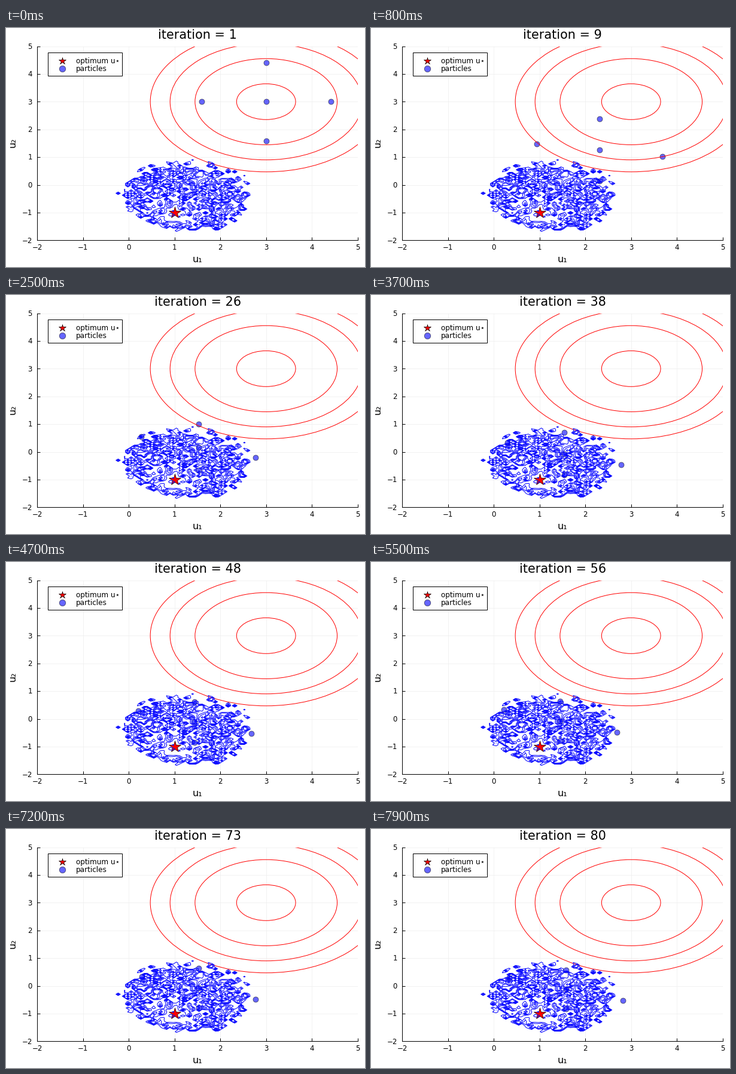
Animation of 600 by 400 pixels, one loop 8000 ms. Source, as a matplotlib script:

```python
import numpy as np
import matplotlib.pyplot as plt
from matplotlib.animation import FuncAnimation
from matplotlib.patches import Circle, Rectangle

W, H, DPI = 600, 400, 100
PT = 72 / DPI  # points per pixel
LEFT, TOP, RIGHT, BOTTOM = 52.2, 30.5, 587.7, 355.4

plt.rcParams["font.family"] = "DejaVu Sans"
fig = plt.figure(figsize=(W / DPI, H / DPI), dpi=DPI, facecolor="white")
ax = fig.add_axes([LEFT / W, 1 - BOTTOM / H, (RIGHT - LEFT) / W, (BOTTOM - TOP) / H])
ax.set(xlim=(-2, 5), ylim=(-2, 5), xticks=range(-2, 6), yticks=range(-2, 6))
ax.set_axisbelow(True)
ax.grid(color="#efefef", lw=0.8 * PT)
ax.spines[["top", "right"]].set_visible(False)
ax.spines[["left", "bottom"]].set_linewidth(PT)
ax.tick_params(direction="in", length=5 * PT, width=PT,
               labelbottom=False, labelleft=False)

# Overlay in pixel coordinates, origin at the top left
top = fig.add_axes([0, 0, 1, 1], zorder=5)
top.set(xlim=(0, W), ylim=(H, 0))
top.axis("off")


def label(x, y, s, px, ha="center", **kw):
    return top.text(x, y, s, fontsize=px * PT, ha=ha, va="baseline", **kw)


def marker(axes, x, y, shape, px, color, **kw):
    return axes.plot(x, y, shape, ms=px * PT, mfc=color, mec="black", **kw)[0]


def star(axes, x, y, px, **kw):
    return marker(axes, x, y, "*", px, "red", mew=0.7 * PT, **kw)


def dots(axes, x, y, px, **kw):
    return marker(axes, x, y, "o", px, "blue", mew=0.8 * PT, alpha=0.6, **kw)


for v in range(-2, 6):
    s = str(v).replace("-", "\u2212")
    label(LEFT + (v + 2) * (RIGHT - LEFT) / 7, 371, s, 11.8)
    label(43.7, BOTTOM - (v + 2) * (BOTTOM - TOP) / 7 + 4.3, s, 11.8, ha="right")
label(319.8, 392, "u₁", 16)
label(18.7, 191.5, "u₂", 16, rotation=90).set(va="center", ha="right")
title = label(320, 18, "", 20.8)

# Legend
top.add_patch(Rectangle((70, 41), 123.5, 39, fc="white", ec="black", lw=PT))
star(top, [94], [54.5], 12.5)
dots(top, [94], [67.5], 10.5)
label(116.7, 58.7, "optimum u⋆", 12, ha="left")
label(116.7, 72, "particles", 12, ha="left")

# Prior contours
for r in (0.645, 1.553, 2.098, 2.53):
    ax.add_patch(Circle((3, 3), r, fill=False, ec="red", lw=PT, zorder=4))

# Posterior of a noisy misfit; the noise grows away from the lower left
rng = np.random.default_rng(11)
g = np.linspace(-2, 5, 100)
X, Y = np.meshgrid(g, g)
r2 = ((X - 1.25) / 1.2) ** 2 + ((Y + 0.45) / 1.1) ** 2
noise = 0.3 + 0.6 * np.hypot(X - 0.9, Y + 1.3)
misfit = r2 ** 3 + noise * rng.standard_normal(X.shape)
ax.contour(X, Y, np.exp(-misfit ** 2), levels=(0.2, 0.4, 0.6, 0.8),
           colors="blue", linewidths=PT, zorder=4)

star(ax, [1], [-1], 20, zorder=2)
particles = dots(ax, [], [], 9, zorder=3)

# Sideways drift of the mean around its decay
SWAY_T = (0, 8, 17, 25, 37, 47, 64, 79)
SWAY_X = (0, 0.14, 0, -0.11, -0.01, -0.09, -0.05, 0.06)


def sigma_points(t):
    decay = np.exp(-t / 9.7)
    mx = 1.52 + 1.48 * decay + np.interp(t, SWAY_T, SWAY_X)
    my = -0.1 + 3.1 * decay + 0.05 * (1 - decay) * np.sin(2 * np.pi * (t - 53) / 44)
    # Cholesky factor [[a, 0], [b, c]] of the spread
    a = 1.24 + 0.174 * np.exp(-(t / 15) ** 2)
    b = -0.41 * (1 - decay)
    c = 0.7 + 0.714 * np.exp(-t / 15)
    return [mx, mx + a, mx, mx - a, mx], [my, my + b, my + c, my - b, my - c]


def update(i):
    particles.set_data(*sigma_points(i))
    title.set_text(f"iteration = {i + 1}")
    return particles, title


anim = FuncAnimation(fig, update, frames=80, interval=100,
                     init_func=lambda: update(0), repeat=True, repeat_delay=0)
plt.show()
```
